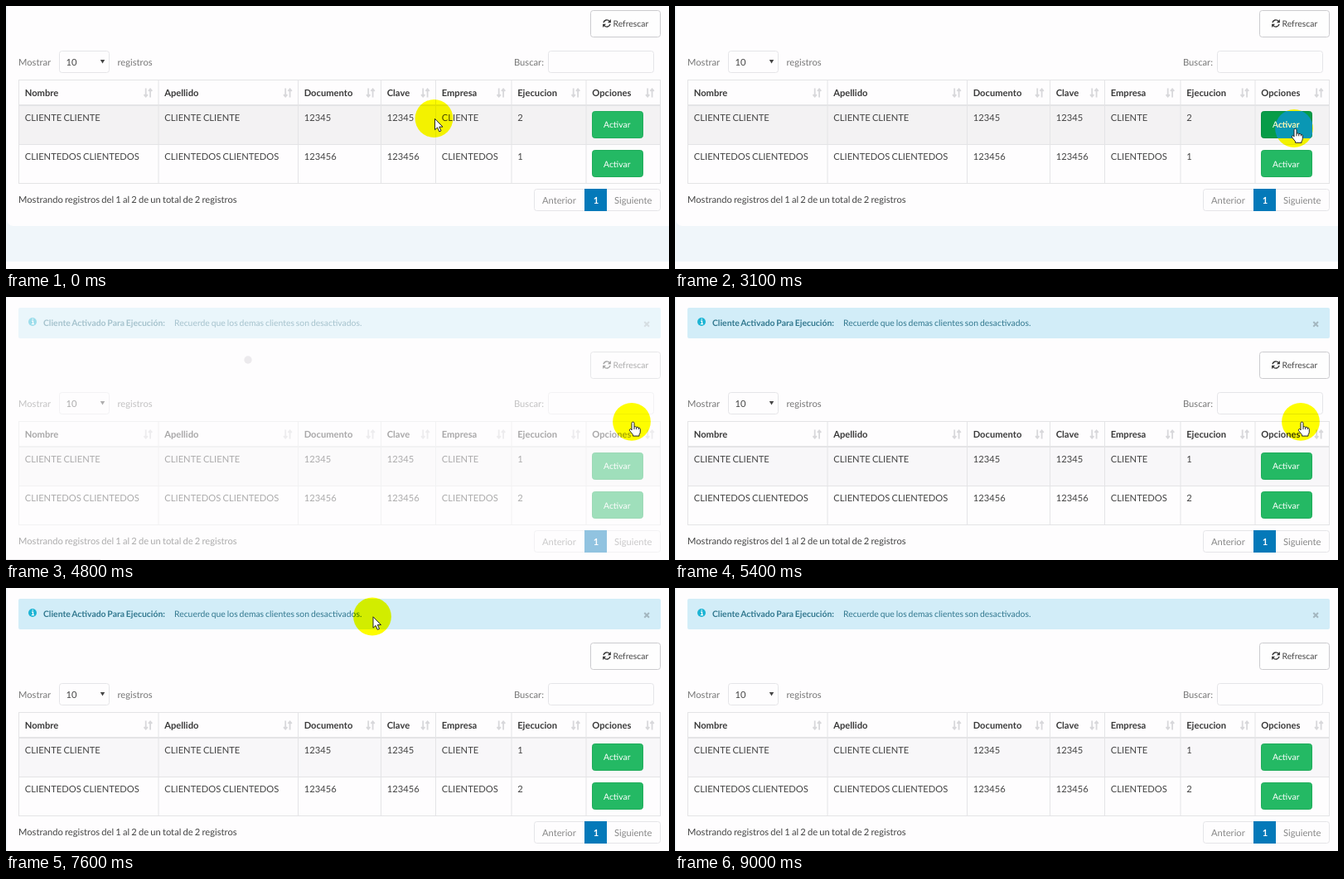
An HTML page for the animation above (9.4 s loop, 800 by 318 pixels).

```html
<!DOCTYPE html>
<html lang="es">
<head>
<meta charset="utf-8">
<title>Clientes</title>
<style>
  html, body { margin: 0; width: 100%; height: 100%; overflow: hidden; background: #fefdfe; }
  svg { display: block; width: 100vw; height: 100vh; }
  text { font: 11.2px Lato, "Open Sans", sans-serif; fill: #444; white-space: pre; word-spacing: -.7px; text-rendering: geometricPrecision; }
  .label { fill: #777; }
  .head { font-weight: 700; fill: #3a3a3a; }
  .small { font-size: 10.4px; }
  .white { fill: #fff; }
  .page { fill: #888; }
  .note { fill: #32788f; }
  .warm { fill: #f6f29a; }
  .line { fill: none; stroke: #e4e4e6; }
  .box { fill: #fefdfe; stroke: #e5e5e8; }
</style>
</head>
<body>
<svg id="stage" viewBox="0 0 800 318" xmlns="http://www.w3.org/2000/svg"></svg>
<script>
const LOOP = 9400, STEP = 100, R = 22.9;
const edges = [15.5, 184, 352.5, 452.5, 518.5, 610, 700, 789.5];
const titles = ['Nombre', 'Apellido', 'Documento', 'Clave', 'Empresa', 'Ejecucion', 'Opciones'];

const text = (x, y, s, cls = '') => `<text x="${x}" y="${y}" class="${cls}">${s}</text>`;
const rect = (x, y, w, h, attrs) => `<rect x="${x}" y="${y}" width="${w}" height="${h}" ${attrs}/>`;

const sortIcon = x => `<path transform="translate(${x} 105)" fill="none" stroke="#d8d8db" stroke-width="1.8"
  d="M-2.7 -5.5V4.2M-4.9 2.2L-2.7 4.6L-.5 2.2M2.7 5.5V-4.2M.5 -2.2L2.7 -4.6L4.9 -2.2"/>`;

const refreshIcon = `<g transform="translate(725 21)" fill="none" stroke="#333" stroke-width="1.4">
  <path d="M-4 -.8A4.1 4.1 0 0 1 3.2 -2.6M4 .8A4.1 4.1 0 0 1 -3.2 2.6"/>
  <path fill="#333" stroke="none" d="M4.9 -4.9V-.8H.9ZM-4.9 4.9V.8H-.9Z"/></g>`;

function row(i, name, code, runs) {
  const y = 138.5 + i * 47.3;
  const cells = [`${name} ${name}`, `${name} ${name}`, code, code, name, runs];
  return cells.map((s, c) => text(edges[c] + 7.3, y, s)).join('');
}

function activate(i, id) {
  const y = 127 + i * 47;
  return rect(707.5, y + .5, 61, 32, `id="${id}${i}" rx="3" fill="#24b964" stroke="#1fac5a"`);
}

function panel(id, dy, stripe, runs) {
  const columns = edges.map(x => `M${x} 89.5V214.5`).join('');
  return `<g transform="translate(0 ${dy})">
    ${rect(0, -70, 800, 379, 'fill="#f0f6fa"')}
    ${rect(1.5, -80, 806, 346, 'rx="7" fill="#fefdfe"')}
    ${rect(705.5, 5.5, 84, 32, 'rx="3" fill="#fefefe" stroke="#cbcbce"')}
    ${refreshIcon}
    ${text(732.5, 25, 'Refrescar', 'small')}
    ${text(15, 71.5, 'Mostrar', 'label')}
    ${rect(64.5, 54.5, 60, 26, 'rx="3" class="box"')}
    ${text(72.5, 71.5, '10')}
    <path d="M113.8 65H119.2L116.5 69.4Z" fill="#444"/>
    ${text(134.5, 71.5, 'registros', 'label')}
    ${text(613, 71.5, 'Buscar:', 'label')}
    ${rect(654.5, 54.5, 127, 26, 'rx="3" class="box"')}
    ${rect(15, 120, 775, 47, `fill="${stripe}"`)}
    <path class="line" d="${columns}M15 89.5H790M15 167.5H790M15 214.5H790"/>
    <path class="line" stroke-width="2" d="M15 120H790"/>
    ${titles.map((s, c) => text(edges[c] + 7.2, 108.8, s, 'head') + sortIcon(edges[c + 1] - 12.6)).join('')}
    ${row(0, 'CLIENTE', '12345', runs[0])}
    ${row(1, 'CLIENTEDOS', '123456', runs[1])}
    ${activate(0, id)}${activate(1, id)}
    ${id === 'before' ? `<circle id="tint" r="${R}" fill="#0a97b4" clip-path="url(#inside)"/>` : ''}
    ${text(721, 147.3, 'Activar', 'small white')}
    ${text(721, 194.5, 'Activar', 'small white')}
    ${text(15, 238, 'Mostrando registros del 1 al 2 de un total de 2 registros')}
    ${rect(637.5, 221.5, 152, 26, 'rx="3" class="box"')}
    ${rect(698, 221, 27, 27, 'fill="#0479b9"')}
    ${text(647, 238.7, 'Anterior', 'page')}
    ${text(708.7, 238.7, '1', 'head white')}
    ${text(734, 238.7, 'Siguiente', 'page')}
  </g>`;
}

const notice = `
  ${rect(15, 13, 775, 37, 'rx="2" fill="#d2edf8"')}
  <circle cx="32" cy="30" r="5" fill="#1cb4d4"/>
  <path d="M31 29.2H32.6V32.7M30.8 32.7H34M31.6 26.9H32.9" fill="none" stroke="#fff" stroke-width="1.2"/>
  ${text(45, 35.3, 'Cliente Activado Para Ejecución:', 'small head note')}
  ${text(203, 35.3, 'Recuerde que los demas clientes son desactivados.', 'small note')}
  <path d="M770.3 30L776 35.7M776 30L770.3 35.7" stroke="#a3b6bf" stroke-width="2"/>`;

const stage = document.getElementById('stage');
stage.innerHTML = `
  <defs>
    <clipPath id="inside"><rect x="707" y="127" width="62" height="33" rx="3"/></clipPath>
    <clipPath id="outside"><path clip-rule="evenodd" d="M0 0H800V318H0ZM707 127H769V160H707Z"/></clipPath>
    <clipPath id="spot"><circle id="spotShape" r="${R}"/></clipPath>
  </defs>
  ${rect(0, 0, 800, 318, 'fill="#fefdfe"')}
  <g id="old">
    ${panel('before', 0, '#f3f2f3', [2, 1])}
    <g id="lit" clip-path="url(#spot)">${text(721, 147.3, 'Activar', 'small warm')}</g>
  </g>
  <g id="new">${panel('after', 61, '#f8f7f9', [1, 2])}${notice}</g>
  <g id="loading">
    <circle cx="292" cy="76" r="4.7" fill="#c9c7cd"/>
    ${rect(0, 317, 114, 1, 'fill="#c4c4c6"')}
  </g>
  <g id="halo" style="mix-blend-mode:multiply"><circle id="disc" r="${R}" fill="#ff0"/></g>
  <g id="pointer" stroke="#222" stroke-width="1" stroke-linejoin="round" fill="#fff">
    <path id="arrow" d="M.5 0V13.4L3.6 10.6L5.8 15.6L8 14.6L5.8 9.8H10Z"/>
    <g id="hand">
      <path d="M-1.5 9V1.5Q-1.5 0 0 0Q1.5 0 1.5 1.5V6Q3 5 4.2 6.3Q5.6 5.6 6.8 7Q8.6 6.8 8.8 8.6V12Q8.8 14 7.5 15.5V17H0V15.5L-4 10.5Q-4.6 8.6 -3 8.4Q-2 8.4 -1.5 9.8Z"/>
      <path fill="none" d="M1.5 6V9M4.2 6.5V9M6.8 7V9"/>
    </g>
  </g>`;

const el = id => document.getElementById(id);
const clamp = v => Math.max(0, Math.min(1, v));
const smooth = v => v * v * (3 - 2 * v);

// time, x, y of the pointer
const path = [
  [1300, 516.5, 136], [1700, 646.7, 145], [2100, 747, 153.5], [2300, 747, 153.5],
  [2700, 718.5, 141.5], [3100, 747, 148], [3300, 755, 149.5], [3500, 755, 150.8],
  [6000, 755, 150.8], [6500, 480, 118], [7000, 209, 81], [7200, 225, 48],
  [7600, 442, 34.5], [8000, 240, 28], [8100, 234, 28], [8200, 234, 28], [9000, 300, 350]
];

function pointerAt(t) {
  if (t <= path[0][0]) return path[0].slice(1);
  const i = path.findIndex(p => p[0] > t);
  if (i < 0) return path[path.length - 1].slice(1);
  const [t0, x0, y0] = path[i - 1], [t1, x1, y1] = path[i];
  const k = (t - t0) / (t1 - t0);
  return [x0 + (x1 - x0) * k, y0 + (y1 - y0) * k];
}

const show = (id, on) => el(id).setAttribute('display', on ? 'inline' : 'none');

function place(id, x, y) {
  el(id).setAttribute('cx', x);
  el(id).setAttribute('cy', y);
}

function draw(t) {
  const [x, y] = pointerAt(t);
  const first = t < 3900;
  const hover = t < 6100 && x > 707;

  el('old').setAttribute('opacity', 1 - clamp((t - 3800) / 500));
  el('new').setAttribute('opacity', smooth(clamp((t - 4300) / 1100)));
  el('loading').setAttribute('opacity', clamp((t - 4000) / 300) * clamp((4900 - t) / 300));

  el('before0').setAttribute('fill', hover ? '#079c48' : '#24b964');
  el('before0').setAttribute('stroke', hover ? '#068f41' : '#1fac5a');
  ['disc', 'tint', 'spotShape'].forEach(id => place(id, x, y));
  show('tint', first);
  show('lit', first);
  if (first) el('halo').setAttribute('clip-path', 'url(#outside)');
  else el('halo').removeAttribute('clip-path');

  const gone = t >= 9000;
  show('halo', !gone);
  show('pointer', !gone);
  show('hand', hover);
  show('arrow', !hover);
  el('pointer').setAttribute('transform', `translate(${x + (hover ? 1.5 : .5)} ${y + .3})`);
}

const start = performance.now();
function tick() {
  const t = (performance.now() - start) % LOOP;
  draw(Math.floor(t / STEP) * STEP);
  requestAnimationFrame(tick);
}
tick();
</script>
</body>
</html>
```
